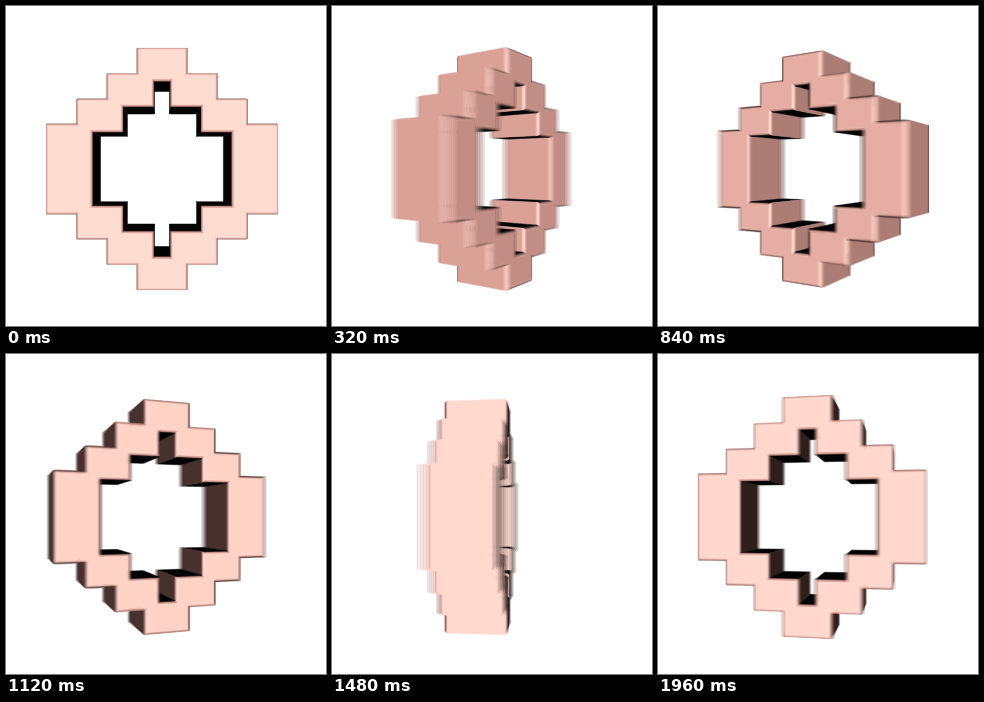
Write an HTML page with a canvas that moves like this. It is 320x320 px and loops after 2000 ms.

```html
<!DOCTYPE html>
<html lang="en">
<head>
<meta charset="utf-8">
<title>Turning stepped ring</title>
<style>
  html, body { margin: 0; width: 100%; height: 100%; overflow: hidden; background: #fff; }
  canvas { display: block; width: 320px; height: 320px; }
</style>
</head>
<body>
<canvas id="stage" width="320" height="320"></canvas>
<script>
const SIZE = 320, CX = 155.3, CY = 163, CAMERA = 450;
const FRONT = 38.5, BACK = -21.5, OFFSET = 0.7;
const FILLET = 2.8, FILLET_STEPS = 4;
const FRAME_MS = 40, FRAMES = 50, STEP = 360 / FRAMES, SAMPLES = 5;

const stage = document.getElementById('stage').getContext('2d');
const buffer = document.createElement('canvas');
buffer.width = buffer.height = SIZE;
const ctx = buffer.getContext('2d');
ctx.lineJoin = 'round';
ctx.lineWidth = 0.5;

// Full staircase outline, counter-clockwise, from the steps of one quadrant
function outline(steps) {
  const quarter = steps.flatMap(([x, y], i) => i ? [[x, steps[i - 1][1]], [x, y]] : [[x, y]]);
  const mirrored = [...quarter].reverse();
  return [
    ...quarter,
    ...mirrored.map(([x, y]) => [-x, y]),
    ...quarter.map(([x, y]) => [-x, -y]),
    ...mirrored.map(([x, y]) => [x, -y])
  ];
}

// Each corner with its mitre direction, each edge with its outward normal
function makeRing(points) {
  const count = points.length;
  const normals = points.map(([x, y], i) => {
    const [nextX, nextY] = points[(i + 1) % count];
    return [Math.sign(nextY - y), Math.sign(x - nextX)];
  });
  return points.map(([x, y], i) => {
    const normal = normals[i], previous = normals[(i + count - 1) % count];
    return { x, y, normal, mitre: [normal[0] + previous[0], normal[1] + previous[1]] };
  });
}

const rings = [
  makeRing(outline([[106.4, 41.3], [78.3, 64.3], [50.6, 87.8], [23, 111]])),
  makeRing(outline([[64, 34], [36, 57.3], [7.8, 80.7]]).reverse())
];

// Cross-section of the wall from back cap to front cap, with rounded ends
function makeProfile() {
  const profile = [];
  for (const [end, from] of [[BACK + FILLET, -FILLET_STEPS], [FRONT - FILLET, 0]]) {
    for (let i = 0; i <= FILLET_STEPS; i++) {
      const tilt = (from + i) / FILLET_STEPS * Math.PI / 2;
      profile.push({ tilt, inset: FILLET * (1 - Math.cos(tilt)), z: end + FILLET * Math.sin(tilt) });
    }
  }
  return profile;
}
const profile = makeProfile();

// Colour by how far a surface faces the viewer
const tones = [
  [0, 3, 2, 2], [0.15, 44, 30, 27], [0.38, 82, 58, 53], [0.56, 196, 143, 134],
  [0.82, 218, 160, 150], [0.91, 255, 206, 194], [1, 255, 219, 208]
];

function shade(facing) {
  const v = Math.min(1, Math.max(0, facing));
  const i = Math.max(1, tones.findIndex(tone => v <= tone[0]));
  const a = tones[i - 1], b = tones[i];
  const k = (v - a[0]) / (b[0] - a[0]);
  return `rgb(${[1, 2, 3].map(c => Math.round(a[c] + (b[c] - a[c]) * k))})`;
}

function tracePath(points) {
  points.forEach(([x, y, z], i) => {
    const s = CAMERA / (CAMERA - z);
    ctx[i ? 'lineTo' : 'moveTo'](CX + x * s, CY + y * s);
  });
  ctx.closePath();
}

function drawRing(degrees) {
  const angle = degrees * Math.PI / 180;
  const sin = Math.sin(angle), cos = Math.cos(angle);
  const turn = (x, y, z) => [x * cos + z * sin, y, z * cos - x * sin];
  const place = ({ x, y, mitre }, { inset, z }) =>
    turn(x - mitre[0] * inset + OFFSET, y - mitre[1] * inset, z);
  const faces = ([nx, ny, nz], [x, y, z]) => nz * (CAMERA - z) - nx * x - ny * y > 0;

  ctx.fillStyle = '#fff';
  ctx.fillRect(0, 0, SIZE, SIZE);

  const walls = [];
  for (const ring of rings) {
    ring.forEach((a, i) => {
      const b = ring[(i + 1) % ring.length];
      const [x, y, z] = turn((a.x + b.x) / 2 + OFFSET, (a.y + b.y) / 2, (FRONT + BACK) / 2);
      walls.push({ a, b, distance: Math.hypot(x, y, CAMERA - z) });
    });
  }
  walls.sort((p, q) => q.distance - p.distance);
  for (const { a, b } of walls) {
    for (let i = 1; i < profile.length; i++) {
      const p = profile[i - 1], q = profile[i];
      const tilt = (p.tilt + q.tilt) / 2, flat = Math.cos(tilt);
      const normal = turn(a.normal[0] * flat, a.normal[1] * flat, Math.sin(tilt));
      const quad = [place(a, p), place(b, p), place(b, q), place(a, q)];
      if (!faces(normal, quad[0])) continue;
      ctx.beginPath();
      tracePath(quad);
      ctx.fillStyle = ctx.strokeStyle = shade(normal[2]);
      ctx.fill();
      ctx.stroke();
    }
  }

  // The cap that faces the viewer is never hidden, so it goes last
  for (const [end, side] of [[profile[profile.length - 1], 1], [profile[0], -1]]) {
    const normal = turn(0, 0, side);
    if (!faces(normal, turn(OFFSET, 0, end.z))) continue;
    ctx.beginPath();
    for (const ring of rings) tracePath(ring.map(corner => place(corner, end)));
    ctx.fillStyle = shade(normal[2]);
    ctx.fill('evenodd');
  }
}

function draw(now) {
  const frame = Math.floor(now / FRAME_MS) % FRAMES;
  // Motion blur: average of poses since the last step; the first pose is still
  const count = frame ? SAMPLES : 1;
  for (let i = 0; i < count; i++) {
    drawRing(STEP * (frame - i / SAMPLES));
    stage.globalAlpha = 1 / (i + 1);
    stage.drawImage(buffer, 0, 0);
  }
}

const start = performance.now();
function tick() {
  draw(performance.now() - start);
  requestAnimationFrame(tick);
}
tick();
</script>
</body>
</html>
```
